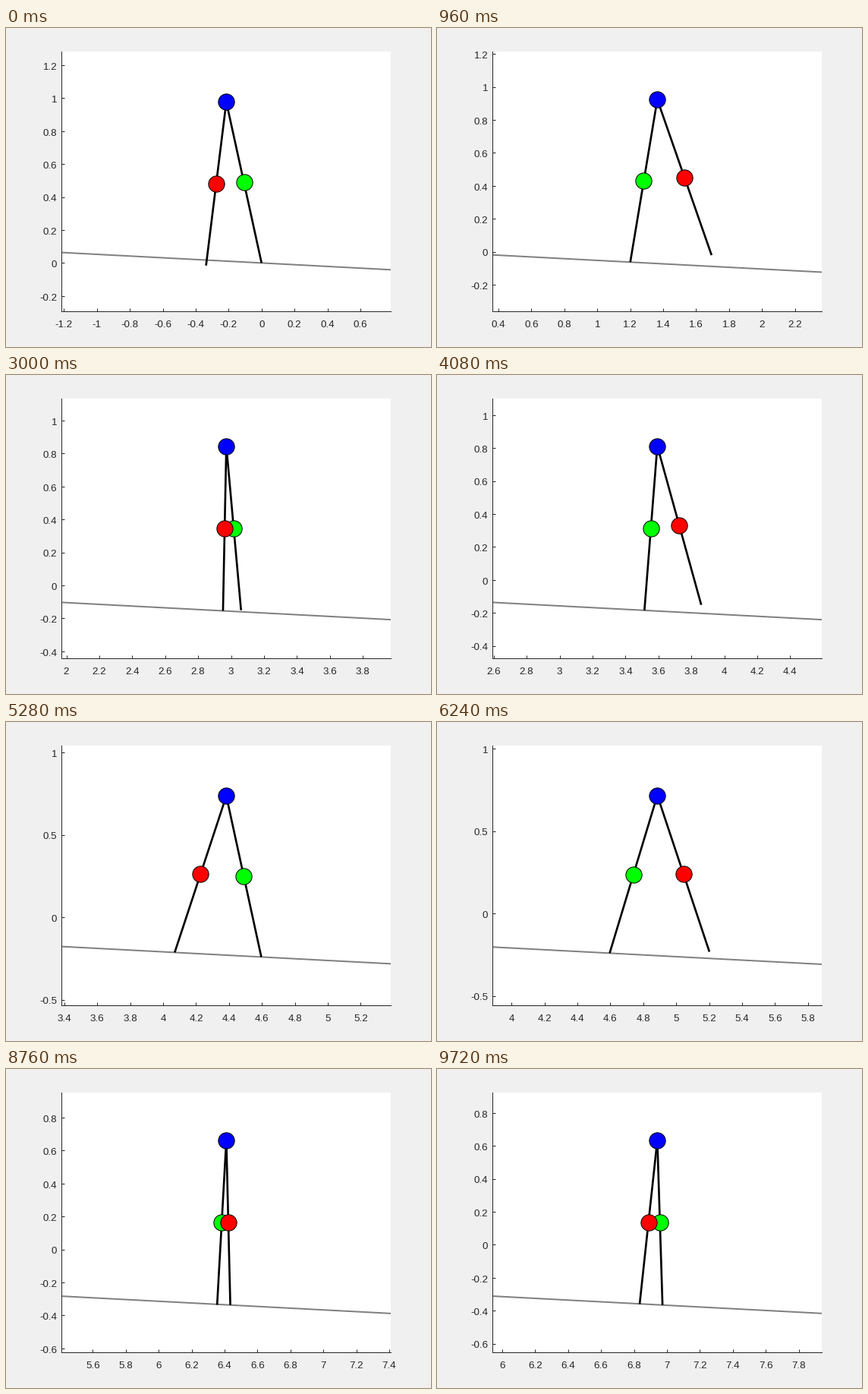
A matplotlib script that plays this animation: 560 px wide and 420 px high, repeating every 9.84 s.

```python
import numpy as np
import matplotlib.pyplot as plt
from matplotlib.animation import FuncAnimation
from matplotlib.transforms import ScaledTranslation

W, H = 560, 420
FRAMES, INTERVAL = 82, 120
PX = 0.72  # points per pixel at 100 dpi
INK = "#262626"

plt.rcParams["font.family"] = "Liberation Sans"
plt.rcParams["axes.unicode_minus"] = False

# Compass walker on a 3 degree slope: leg length 1, masses at hip and mid-leg.
SLOPE = np.radians(3)
OMEGA = 0.3  # inverted pendulum rate per frame
FEET = np.array([0, 0.6, 1.2, 1.8, 2.387, 2.951, 3.515, 4.07, 4.596, 5.2,
                 5.847, 6.435, 6.973, 7.53])
TIMES = np.array([0, 2.2, 5.4, 9.1, 13.25, 21.1, 29.2, 37.1, 44, 52.6,
                  61.97, 69.6, 78.13, 86.2])
REACH = [0.4, 0.4, 0.4, 0.4, 0.52, 0.6, 0.606, 0.6, 0.6, 0.74,
         0.6, 0.606, 0.58]

# Half angle between the legs at each heel strike.
ALPHA = np.append(0.268, np.arcsin(np.diff(FEET) / np.cos(SLOPE) / 2))
SWING_START = ALPHA.copy()
SWING_START[0] = 0.071


def ground(x):
    return -np.tan(SLOPE) * x


def direction(angle):
    return np.array([np.sin(angle), np.cos(angle)])


def pose(frame):
    """Hip, green foot and red foot positions."""
    i = np.searchsorted(TIMES, frame, side="right") - 1
    t, n = frame - TIMES[i], TIMES[i + 1] - TIMES[i]
    u = t / n

    start, end = SLOPE - ALPHA[i], SLOPE + ALPHA[i + 1]
    stance = (start * np.sinh(OMEGA * (n - t))
              + end * np.sinh(OMEGA * t)) / np.sinh(OMEGA * n)

    bend = 0.57 * np.sin(2 * np.pi * u) - REACH[i] * np.sin(np.pi * u)
    swing = (SLOPE + (1 - u) * SWING_START[i] - u * ALPHA[i + 1]
             + bend * (ALPHA[i] + ALPHA[i + 1]) / 2)

    foot = np.array([FEET[i], ground(FEET[i])])
    hip = foot + direction(stance)
    free = hip - direction(swing)
    return (hip, foot, free) if i % 2 == 0 else (hip, free, foot)


def ticks(lo, hi, step):
    k = np.arange(np.ceil(lo / step), np.floor(hi / step) + 1)
    values = np.round(k * step, 1) + 0.0
    return values, ["%g" % v for v in values]


fig = plt.figure(figsize=(W / 100, H / 100), dpi=100, facecolor="#f0f0f0")
AX_W, AX_H = 434, 342.3
ax = fig.add_axes([73.3 / W, 46.7 / H, AX_W / W, AX_H / H])
ax.set_facecolor("white")
HALF_H = AX_H / AX_W

for side in ("top", "right"):
    ax.spines[side].set_visible(False)
for side in ("left", "bottom"):
    ax.spines[side].set(color=INK, linewidth=PX)
ax.tick_params(direction="in", length=4.3 * PX, width=PX, color=INK,
               labelcolor=INK, labelsize=13.33 * PX)
ax.tick_params(axis="x", pad=11.2 * PX)

# Y labels sit slightly below their ticks.
Y_LABELS = (ax.get_yaxis_text1_transform(6 * PX)[0]
            + ScaledTranslation(0, -1.3 / 100, fig.dpi_scale_trans))


def line(color, width, z):
    return ax.plot([], [], color=color, lw=width * PX, zorder=z,
                   solid_capstyle="butt")[0]


def ball(color, z):
    return ax.plot([], [], "o", color=color, ms=21.3 * PX, mec="black",
                   mew=PX, zorder=z)[0]


slope_line = line("#808080", 2, 2)
legs = [line("black", 2.67, 3), line("black", 2.67, 3)]
masses = [ball("#00ff00", 4), ball("#ff0000", 5)]
hip_ball = ball("#0000ff", 6)


def update(frame):
    hip, *feet = pose(frame)
    x0, x1 = hip[0] - 1, hip[0] + 1
    mid = (hip[1] + ground(hip[0])) / 2
    y0, y1 = mid - HALF_H, mid + HALF_H

    y_step = 0.5 if y0 <= -0.5 and y1 >= 1 else 0.2
    ax.set_xticks(*ticks(x0, x1, 0.2))
    ax.set_yticks(*ticks(y0, y1, y_step))
    ax.set_xlim(x0, x1)
    ax.set_ylim(y0, y1)
    for label in ax.get_yticklabels():
        label.set_transform(Y_LABELS)

    slope_line.set_data([x0, x1], [ground(x0), ground(x1)])
    for leg, mass, foot in zip(legs, masses, feet):
        leg.set_data(*zip(hip, foot))
        center = (hip + foot) / 2
        mass.set_data([center[0]], [center[1]])
    hip_ball.set_data([hip[0]], [hip[1]])
    return [slope_line, *legs, *masses, hip_ball]


anim = FuncAnimation(fig, update, frames=FRAMES, interval=INTERVAL,
                     init_func=lambda: update(0), repeat=True, repeat_delay=0)
plt.show()
```
